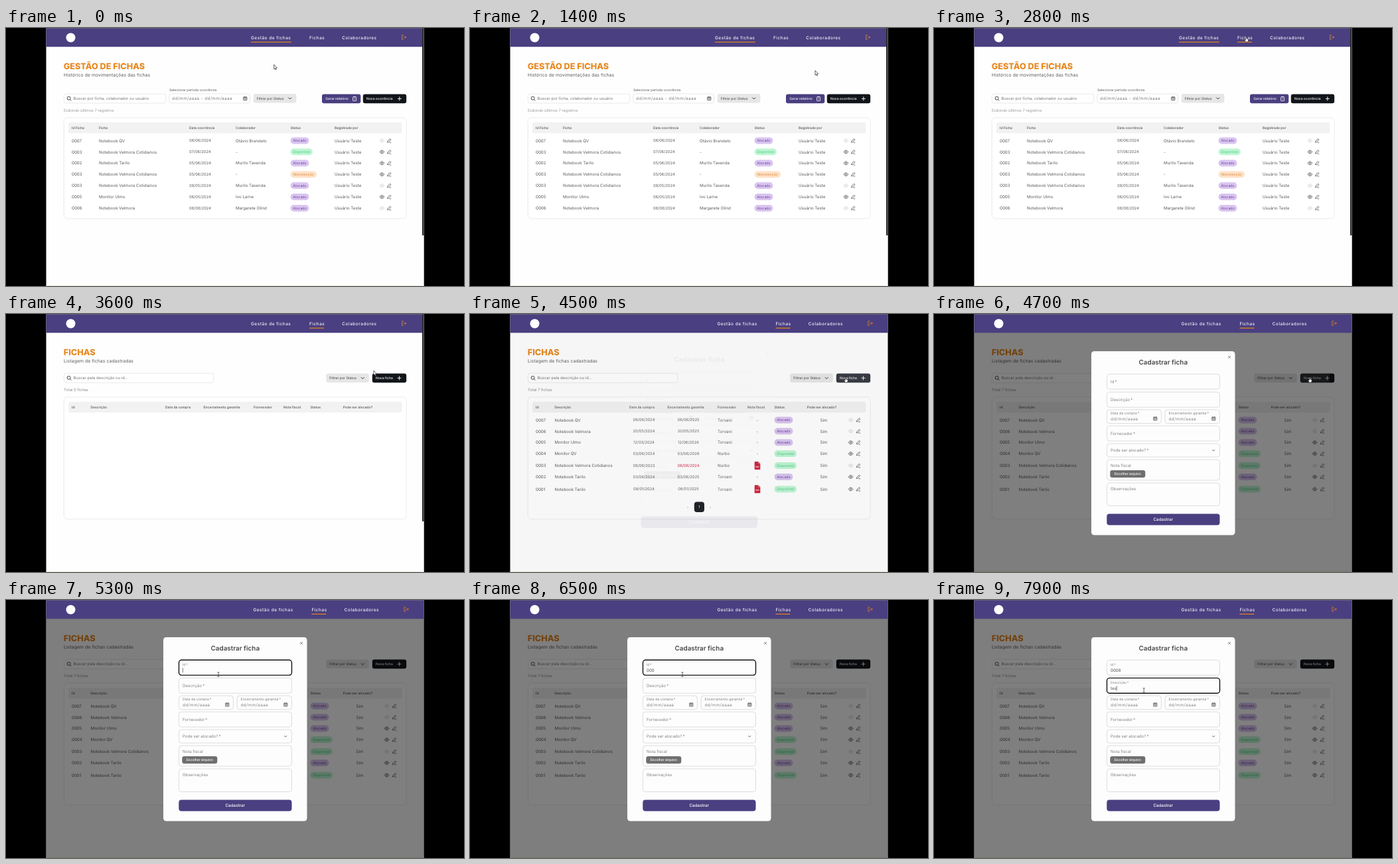
Recreate the animation shown at these times as an HTML page with a canvas. Size 690x388 px, loop 8 s.

```html
<!DOCTYPE html>
<html lang="pt-BR">
<head>
<meta charset="utf-8">
<title>Gestão de fichas</title>
<style>
html, body { margin: 0; width: 100%; height: 100%; overflow: hidden; background: #000; }
canvas { display: block; width: 690px; height: 388px; }
</style>
</head>
<body>
<canvas id="stage"></canvas>
<script>
const dpr = window.devicePixelRatio || 1;

function setup(canvas) {
  canvas.width = 690 * dpr;
  canvas.height = 388 * dpr;
  const context = canvas.getContext('2d');
  context.scale(dpr, dpr);
  context.textRendering = 'geometricPrecision';
  context.lineJoin = 'round';
  return context;
}

const stage = setup(document.getElementById('stage'));
const layer = setup(document.createElement('canvas'));
let ctx = stage;

const LOOP = 8000, STEP = 100;
const LEFT = 60.5, WIDTH = 569;
const PURPLE = '#4a3f80', ORANGE = '#e8881f', INK = '#5a5a5a', BLACK = '#11151a';
const PAGE_SWITCH = 2900, DATA_READY = 3900, MODAL_OPEN = 4490;

const CHIPS = {
  Alocado: ['#dac5f1', '#6b4699', 28],
  Disponível: ['#bdf7d3', '#55c488', 33.5],
  Manutenção: ['#ffe2c6', '#de8e45', 39.5]
};

const history = [
  ['0007', 'Notebook QV', '06/06/2024', 'Otávio Brandelo', 'Alocado', 0],
  ['0003', 'Notebook Velmora Cotidianos', '07/06/2024', '-', 'Disponível', 1],
  ['0002', 'Notebook Tarilo', '05/06/2024', 'Murilo Tavenda', 'Alocado', 1],
  ['0003', 'Notebook Velmora Cotidianos', '05/06/2024', '-', 'Manutenção', 1],
  ['0003', 'Notebook Velmora Cotidianos', '08/05/2024', 'Murilo Tavenda', 'Alocado', 0],
  ['0005', 'Monitor Ulmo', '06/05/2024', 'Ivo Larne', 'Alocado', 1],
  ['0006', 'Notebook Velmora', '06/06/2024', 'Margarete Olind', 'Alocado', 0]
];

const items = [
  ['0007', 'Notebook QV', '06/06/2024', '06/06/2025', 'Torvani', 'Alocado', 0],
  ['0006', 'Notebook Velmora', '20/05/2024', '20/05/2025', 'Torvani', 'Alocado', 0],
  ['0005', 'Monitor Ulmo', '12/03/2024', '12/06/2024', 'Torvani', 'Alocado', 1],
  ['0004', 'Monitor QV', '03/06/2024', '03/06/2026', 'Nurbo', 'Disponível', 1],
  ['0003', 'Notebook Velmora Cotidianos', '06/06/2023', '06/06/2024', 'Nurbo', 'Disponível', 0, 'pdf', 'late'],
  ['0002', 'Notebook Tarilo', '03/06/2024', '03/06/2025', 'Torvani', 'Alocado', 1],
  ['0001', 'Notebook Tarilo', '08/01/2024', '08/01/2025', 'Torvani', 'Disponível', 1, 'pdf']
];

const clamp = v => Math.max(0, Math.min(1, v));
const mix = (a, b, p) => a + (b - a) * p;

// y is the vertical centre of the capitals.
function text(str, x, y, size = 6.2, color = INK, { weight = 400, align = 'left', gap = 0 } = {}) {
  ctx.font = `${weight} ${size}px Inter, sans-serif`;
  ctx.letterSpacing = gap + 'px';
  ctx.textAlign = align;
  ctx.fillStyle = color;
  ctx.fillText(str, x, y + size * 0.36);
}

function box(x, y, w, h, r, fill, stroke, line = 0.6) {
  ctx.beginPath();
  ctx.roundRect(x, y, w, h, r);
  if (fill) { ctx.fillStyle = fill; ctx.fill(); }
  if (stroke) { ctx.strokeStyle = stroke; ctx.lineWidth = line; ctx.stroke(); }
}

function path(points, color, width = 0.8, fill) {
  ctx.beginPath();
  for (let i = 0; i < points.length; i += 2) ctx.lineTo(points[i], points[i + 1]);
  if (fill) { ctx.closePath(); ctx.fillStyle = fill; ctx.fill(); }
  ctx.strokeStyle = color;
  ctx.lineWidth = width;
  ctx.stroke();
}

function rect(x, y, w, h, fill) {
  ctx.fillStyle = fill;
  ctx.fillRect(x, y, w, h);
}

function at(x, y, draw) {
  ctx.save();
  ctx.translate(x, y);
  draw();
  ctx.restore();
}

function circle(x, y, r, color, width) {
  ctx.beginPath();
  ctx.arc(x, y, r, 0, Math.PI * 2);
  if (width) { ctx.strokeStyle = color; ctx.lineWidth = width; ctx.stroke(); }
  else { ctx.fillStyle = color; ctx.fill(); }
}

const chevron = (x, y, color = '#333', w = 2.3) =>
  at(x, y, () => path([-w, -w / 2, 0, w / 2, w, -w / 2], color, 1));

const plus = (x, y) => at(x, y, () => {
  path([-3, 0, 3, 0], '#fff', 0.9);
  path([0, -3, 0, 3], '#fff', 0.9);
});

const lens = (x, y) => at(x, y, () => {
  circle(-0.4, -0.4, 2.5, '#333', 0.9);
  path([1.4, 1.4, 3.4, 3.4], '#333', 0.9);
});

const calendar = (x, y) => at(x, y, () => {
  box(-2.7, -2.4, 5.4, 5.2, 0.7, '#b5b5b5', '#777', 0.8);
  path([-2.7, -1.4, 2.7, -1.4], '#777', 1.1);
  path([-1.4, -3.2, -1.4, -2], '#777');
  path([1.4, -3.2, 1.4, -2], '#777');
});

const eye = (x, y, active) => at(x, y, () => {
  const color = active ? '#444' : '#d2d2d2';
  ctx.beginPath();
  ctx.moveTo(-3.4, 0);
  ctx.quadraticCurveTo(0, -5, 3.4, 0);
  ctx.quadraticCurveTo(0, 5, -3.4, 0);
  ctx.strokeStyle = color;
  ctx.lineWidth = 0.75;
  ctx.stroke();
  circle(0, 0, 1.1, color, 0.75);
});

const pencil = (x, y) => at(x, y, () => {
  path([-2.7, 2.6, -2.2, 0.7, 1.4, -2.9, 2.8, -1.5, -0.8, 2.1, -2.7, 2.6], '#444', 0.75);
  path([0.3, 2.8, 3, 2.8], '#444', 0.75);
});

const pdf = (x, y) => at(x, y, () => {
  path([-4, -5.7, 1.4, -5.7, 4, -3.1, 4, 5.7, -4, 5.7], '#cc1433', 0.6, '#cc1433');
  path([1.4, -5.7, 1.4, -3.1, 4, -3.1], '#f3b4bd', 0.6);
  text('PDF', 0, 1.8, 3, '#fff', { weight: 700, align: 'center' });
});

function chip(label, x, y) {
  const [bg, fg, w] = CHIPS[label];
  box(x, y - 5, w, 10, 5, bg);
  text(label, x + w / 2, y, 5.3, fg, { align: 'center' });
}

function button(x, y, w, label, fill) {
  box(x, y, w, 13.8, 3, fill);
  text(label, x + 5.3, y + 6.9, 5, '#fff', { weight: 500 });
}

function filter(x, y) {
  box(x, y, 64.5, 13.6, 3, '#e6e6e6');
  text('Filtrar por Status', x + 5, y + 6.8, 5.1, '#555', { weight: 500 });
  chevron(x + 55, y + 6.8);
}

function search(y, w, hint) {
  box(87.3, y, w, 14, 3, '#fff', '#d9d9d9');
  lens(95, y + 7);
  text(hint, 101.5, y + 7, 5.9, '#757575');
}

function card(y, h) {
  ctx.save();
  ctx.shadowColor = 'rgba(0,0,0,.06)';
  ctx.shadowBlur = 2 * dpr;
  box(87.3, y, 515.7, h, 5, '#fff');
  ctx.restore();
  box(87.3, y, 515.7, h, 5, null, '#e4e4e4');
  box(94, y + 7, 502.5, 16.3, 2.5, '#f2f2f2');
}

function titles(title, subtitle) {
  text(title, 86.8, 57, 12.7, ORANGE, { weight: 800 });
  text(subtitle, 87, 70.8, 6.8, '#5a5a5a', { gap: 0.1 });
}

const heads = (y, list) => list.forEach(([label, x, align]) =>
  text(label, x, y, 5, '#626262', { weight: 600, align }));

function historyPage() {
  titles('GESTÃO DE FICHAS', 'Histórico de movimentações das fichas');
  search(99, 153.5, 'Buscar por ficha, colaborador ou usuário');
  text('Selecionar período ocorrência', 246, 93, 5, '#555');
  box(246, 99, 121.5, 14, 3, '#fff', '#d9d9d9');
  text('dd/mm/aaaa - dd/mm/aaaa', 250, 106, 6.2, '#777', { gap: 0.48 });
  calendar(360.3, 106);
  filter(372.8, 99);
  button(476, 99.4, 58.3, 'Gerar relatório', PURPLE);
  box(522.6, 103.7, 5, 5.8, 0.6, null, '#fff', 0.8);
  path([523.8, 103.4, 526.4, 103.4], '#fff', 1.2);
  path([523.8, 106.7, 526.4, 106.7], '#fff', 0.6);
  button(537.8, 99.4, 65.4, 'Nova ocorrência', BLACK);
  plus(592.8, 106.3);
  text('Exibindo últimos 7 registros', 87, 124.4, 5.8, '#999');
  card(135, 151.5);
  heads(150.3, [['Id Ficha', 99], ['Ficha', 140], ['Data ocorrência', 276],
    ['Colaborador', 346], ['Status', 428.5], ['Registrado por', 495]]);
  history.forEach(([id, name, date, person, status, active], i) => {
    const y = 169.4 + i * 16.92;
    text(id, 99, y);
    text(name, 140, y);
    text(date, 276, y, 5.8);
    text(person, 346, y);
    chip(status, 428.5, y);
    text('Usuário Teste', 495, y);
    eye(566.4, y, active);
    pencil(577.2, y);
  });
}

function newItemButton(t) {
  const hovered = t >= 3700 && t < 4600;
  button(551.8, 89.4, 51.4, 'Nova ficha', hovered ? '#3a3c44' : BLACK);
  const age = clamp((t - 4500) / 400);
  if (age > 0 && age < 1) {
    ctx.save();
    ctx.beginPath();
    ctx.roundRect(551.8, 89.4, 51.4, 13.8, 3);
    ctx.clip();
    circle(566, 97, 10 + 40 * age, `rgba(255,255,255,${0.45 * (1 - age) ** 2})`);
    ctx.restore();
  }
  plus(592.5, 96.3);
}

function itemsPage(t) {
  const loaded = t >= DATA_READY;
  titles('FICHAS', 'Listagem de fichas cadastradas');
  search(89.3, 225.7, 'Buscar pela descrição ou id...');
  filter(482.3, 89.5);
  newItemButton(t);
  text(`Total ${loaded ? 7 : 0} fichas`, 87, 114, 5.8, '#8a8a8a');
  card(125, 183.3);
  heads(140.2, [['Id', 99], ['Descrição', 127.5], ['Data da compra', 259, 'center'],
    ['Encerramento garantia', 325, 'center'], ['Fornecedor', 373],
    ['Nota fiscal', 431, 'center'], ['Status', 458.5], ['Pode ser alocado?', 530, 'center']]);
  if (!loaded) return;
  const center = { align: 'center' };
  items.forEach(([id, name, bought, warranty, seller, status, active, file, late], i) => {
    const y = 159.4 + i * 16.9 + (i > 3 ? 1 : 0) + (i > 5 ? 1.6 : 0);
    text(id, 99, y);
    text(name, 127.5, y);
    text(bought, 262, y, 5.8, INK, center);
    text(warranty, 329, y, 5.8, late ? '#d2143f' : INK, center);
    text(seller, 373, y);
    if (file) pdf(433, y); else text('-', 433, y, 6.2, INK, center);
    chip(status, 458.5, y);
    text('Sim', 533, y, 6.2, INK, center);
    eye(573.6, y, active);
    pencil(585, y);
  });
  text('‹', 328, 290, 7, '#bbb', center);
  text('›', 362, 290, 7, '#bbb', center);
  box(337.8, 282.5, 15.2, 15.4, 4, BLACK);
  text('1', 345.4, 290.2, 5.5, '#fff', center);
}

function header(t) {
  const shift = t >= MODAL_OPEN ? 3.4 : 0;
  const onItems = t >= PAGE_SWITCH;
  rect(LEFT, 0.5, WIDTH, 27.8, PURPLE);
  circle(97.5, 14.5, 7, '#fff');
  const links = [
    ['Gestão de fichas', 369, 61, !onItems],
    ['Fichas', 457, 22, onItems || t >= 2600],
    ['Colaboradores', 506.3, 53, false]
  ];
  links.forEach(([label, x, w, active]) => {
    text(label, x + shift, 14.2, 6.5, '#f4f2fa', { weight: 500, gap: 0.5 });
    if (active) rect(x + shift, 20.6, w, 1.2, ORANGE);
  });
  at(599.5 + shift, 14, () => {
    path([-0.6, -3.2, -3, -3.2, -3, 3.2, -0.6, 3.2], ORANGE);
    path([-1.2, 0, 3.4, 0], ORANGE);
    path([1.7, -1.8, 3.5, 0, 1.7, 1.8], ORANGE);
  });
}

const typed = (str, times, t) => str.slice(0, times.filter(k => t >= k).length);

function field(label, y, h, { labelY = y + h / 2, focus = 0, focused = false, value = '', caret = false } = {}) {
  const x = 260.5;
  box(x, y, 170, h, 4, null, focused ? '#111' : '#cfcfcf', focused ? 1.4 : 0.7);
  text(label, x + 5.5, mix(labelY, y + 7, focus), mix(6.1, 5, focus), '#808080');
  if (focus < 1) return;
  const valueY = y + 15.3;
  text(value, x + 5.5, valueY, 6.2, '#555');
  if (caret) {
    const end = x + 5.9 + ctx.measureText(value).width;
    path([end, valueY - 3.5, end, valueY + 3.5], '#222', 0.6);
  }
}

function dateField(label, x, w) {
  box(x, 144, w, 20.6, 4, null, '#cfcfcf', 0.7);
  text(label, x + 5.5, 149.2, 5.3, '#808080');
  text('dd/mm/aaaa', x + 5.5, 157.6, 6.2, '#808080', { gap: 0.48 });
  calendar(x + w - 9.2, 157.3);
}

function blink(t, times) {
  const last = Math.max(...times.filter(k => t >= k));
  return (t - last) % 1000 < 400;
}

function form(t) {
  const idKeys = [5600, 5800, 6100, 6600];
  const nameKeys = [7500, 7700, 7900];
  const star = '\u2009*';
  box(237, 56, 216.5, 276.5, 4.5, '#fdfdfd');
  path([443, 63, 446.8, 66.8], '#555', 0.7);
  path([446.8, 63, 443, 66.8], '#555', 0.7);
  text('Cadastrar ficha', 345.3, 72.8, 9.9, '#474747', { weight: 600, align: 'center' });

  field('Id' + star, 90.3, 22.8, {
    focus: clamp((t - 5150) / 100), focused: t >= 5200 && t < 7100,
    value: typed('0008', idKeys, t), caret: t < 7100 && blink(t, [5300, ...idKeys])
  });
  field('Descrição' + star, 117.4, 22.8, {
    focus: clamp((t - 7050) / 100), focused: t >= 7100,
    value: typed('tes', nameKeys, t), caret: blink(t, [7200, ...nameKeys])
  });
  dateField('Data da compra' + star, 260.5, 82);
  dateField('Encerramento garantia' + star, 348, 82.5);
  field('Fornecedor' + star, 168.2, 22.8);
  field('Pode ser alocado?' + star, 195, 20);
  chevron(421.2, 205, '#666', 1.9);
  field('Nota fiscal', 219, 31, { labelY: 228.2 });
  box(265.3, 235, 53, 11, 3, '#6f6f6f');
  text('Escolher arquivo', 291.8, 240.5, 5, '#fff', { weight: 500, align: 'center' });
  field('Observações', 254, 34.4, { labelY: 262.6 });
  box(260.3, 300.6, 170.2, 16.8, 4, PURPLE);
  text('Cadastrar', 345.3, 309, 6.3, '#fff', { weight: 500, align: 'center' });
}

// The form is drawn on its own layer so that it fades in as one piece.
function modal(t) {
  const p = clamp((t - MODAL_OPEN) / 150);
  if (!p) return;
  rect(LEFT, 28, WIDTH, 360, `rgba(0,0,0,${0.5 * p})`);

  const scale = mix(1.037, 1, p);
  ctx = layer;
  ctx.clearRect(0, 0, 690, 388);
  at(345.3, 194.2, () => {
    ctx.scale(scale, scale);
    ctx.translate(-345.3, -194.2);
    form(t);
  });
  ctx = stage;
  ctx.globalAlpha = p;
  ctx.drawImage(layer.canvas, 0, 0, 690, 388);
  ctx.globalAlpha = 1;
}

// Pointer stops: time, x, y.
const stops = [
  [0, 403.7, 55], [900, 403.7, 55], [1400, 520, 64], [2000, 520, 64], [2700, 470.3, 13.5],
  [2900, 470.3, 13.5], [3800, 566, 95.5], [4700, 566, 95.5], [5200, 320, 112],
  [6800, 320, 112], [7100, 316.2, 135.8], [LOOP, 316.2, 135.8]
];

function pointer(t) {
  const i = stops.findIndex(s => s[0] > t);
  const [t0, x0, y0] = stops[i - 1], [t1, x1, y1] = stops[i];
  const p = (t - t0) / (t1 - t0), e = p * p * (3 - 2 * p);
  const hand = (t >= 2600 && t <= 3000) || (t >= 3700 && t <= 4700);
  at(mix(x0, x1, e), mix(y0, y1, e), () => {
    if (t >= 5200) {
      path([-1.6, -3.4, 0, -2.9, 1.6, -3.4], '#333', 0.7);
      path([0, -3, 0, 3], '#333', 0.7);
      path([-1.6, 3.4, 0, 2.9, 1.6, 3.4], '#333', 0.7);
    } else if (hand) {
      path([-0.6, 0, 0.6, 0, 0.7, 2.6, 3.1, 3.2, 3.2, 5.2, 2.4, 7.4, -0.6, 7.4, -2.4, 4.6, -1.8, 3.9, -0.7, 4.6],
        '#222', 0.6, '#fff');
    } else {
      path([0, 0, 0, 6.9, 1.5, 5.5, 2.6, 7.9, 3.6, 7.4, 2.6, 5.1, 4.7, 5], '#222', 0.7, '#fff');
    }
  });
}

function render(now) {
  const t = Math.floor((now % LOOP) / STEP) * STEP;
  rect(0, 0, 690, 388, '#000');
  rect(LEFT, 0.5, WIDTH, 387.5, '#fefefe');
  rect(LEFT, 387, WIDTH, 1, '#e6f4da');
  if (t < PAGE_SWITCH) historyPage(); else itemsPage(t);
  modal(t);
  header(t);
  if (t < MODAL_OPEN) {
    rect(627, 0.5, 2.5, 387.5, '#fafafa');
    box(627, 0, 2.5, 312, 1, '#2b2b2b');
  }
  pointer(t);
}

const start = performance.now();
function loop() {
  render(performance.now() - start);
  requestAnimationFrame(loop);
}
loop();
</script>
</body>
</html>
```
